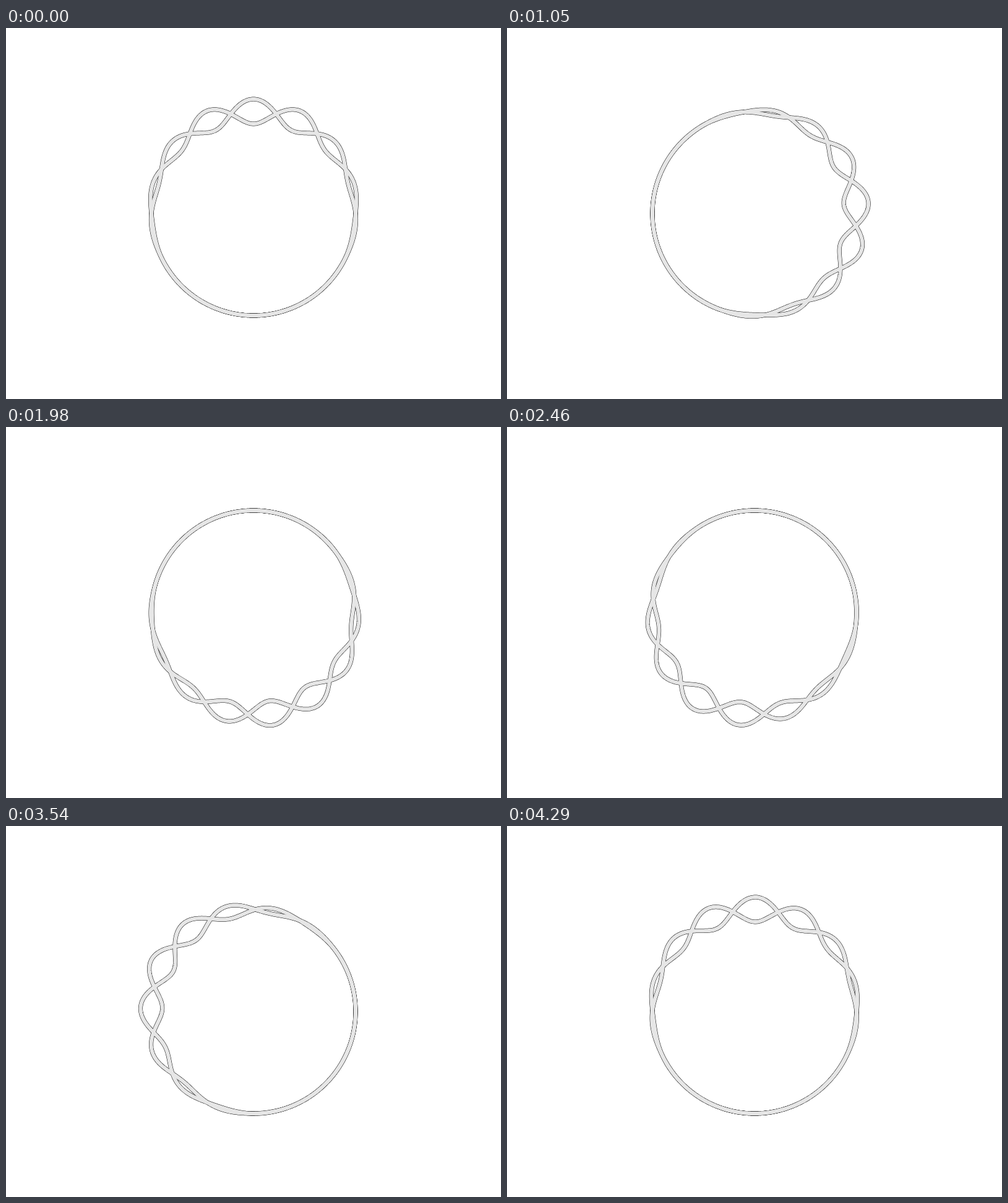
These frames come from a looping animation (800x600 px, 4320 ms). An HTML page with a canvas:

```html
<!DOCTYPE html>
<html>
<head>
<meta charset="utf-8">
<style>
html, body { margin: 0; height: 100%; overflow: hidden; background: #fff; }
canvas { display: block; }
</style>
</head>
<body>
<canvas id="stage" width="800" height="600"></canvas>
<script>
const ctx = document.getElementById('stage').getContext('2d');
const LOOP = 4320, STEP = 30;
const CX = 400, CY = 300, RADIUS = 165, AMP = 20, WAVES = 7;
const POINTS = 720;

// Angles run clockwise from the top of the ring.
function strand(p, sign) {
  const path = new Path2D();
  for (let i = 0; i < POINTS; i++) {
    const a = i / POINTS * 2 * Math.PI;
    const swell = ((1 + Math.cos(a - 2 * Math.PI * p)) / 2) ** 3;
    const wave = Math.cos(WAVES * a + 3 * Math.PI * p);
    const r = RADIUS + sign * AMP * swell * wave;
    path.lineTo(CX + r * Math.sin(a), CY - r * Math.cos(a));
  }
  path.closePath();
  return path;
}

function stroke(paths, color, width) {
  ctx.strokeStyle = color;
  ctx.lineWidth = width;
  for (const path of paths) ctx.stroke(path);
}

function draw(ms) {
  const p = Math.floor(ms % LOOP / STEP) * STEP / LOOP;
  const paths = [strand(p, 1), strand(p, -1)];
  ctx.fillStyle = '#fff';
  ctx.fillRect(0, 0, 800, 600);
  stroke(paths, '#000', 7);
  stroke(paths, '#e6e6e6', 6);
}

let start;
function tick(now) {
  start ??= now;
  draw(now - start);
  requestAnimationFrame(tick);
}
draw(0);
requestAnimationFrame(tick);
</script>
</body>
</html>
```
